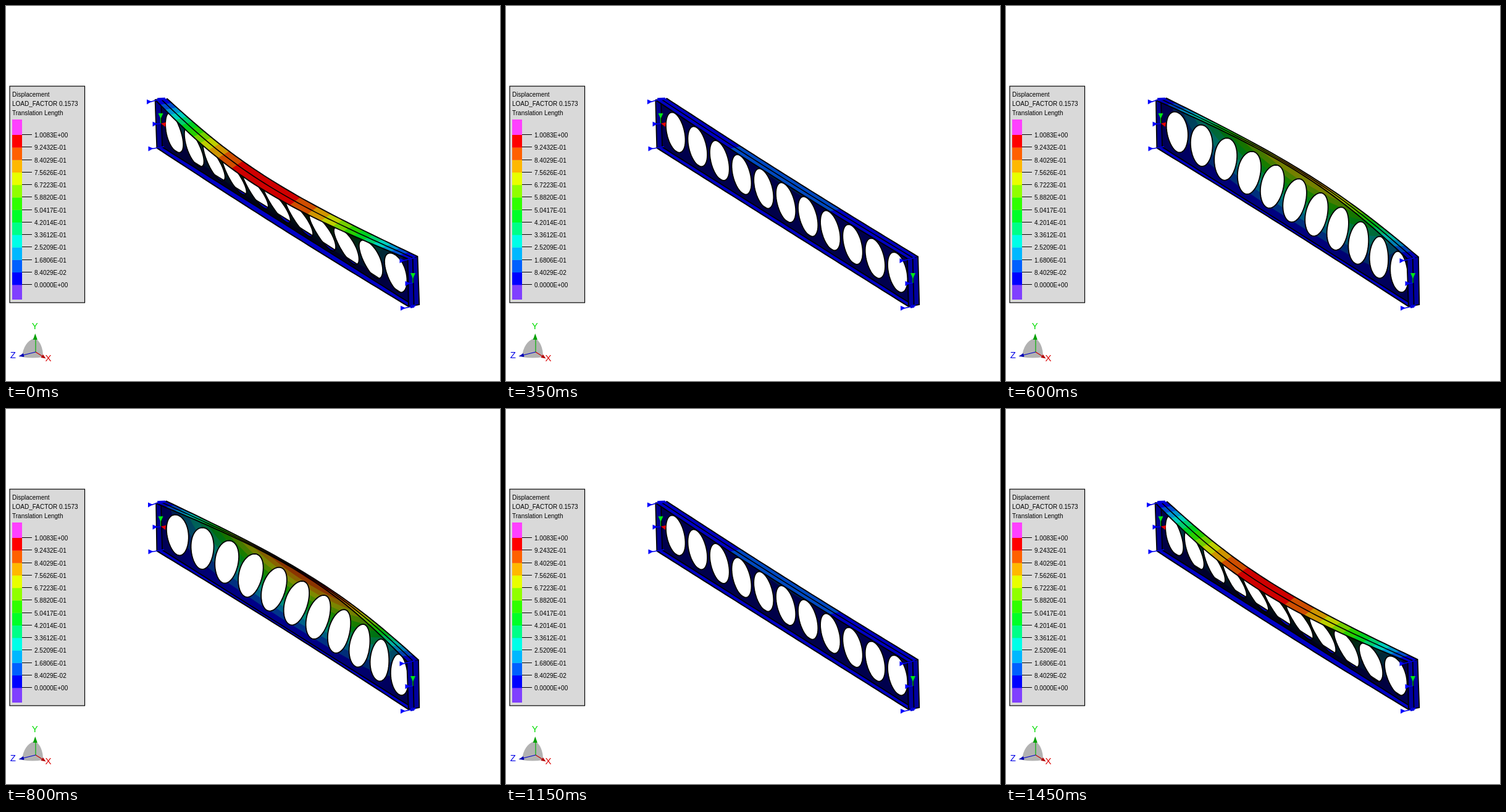
Write an HTML page with a canvas that moves like this. It is 800 by 608 pixels and loops after 1.5 s.

```html
<!DOCTYPE html>
<html>
<head>
<meta charset="utf-8">
<title>Displacement</title>
<style>
html, body { margin: 0; width: 100%; height: 100%; overflow: hidden; background: #fff; }
svg, canvas { position: absolute; left: 0; top: 0; }
text { font-family: "Liberation Sans", Arial, sans-serif; font-size: 10px; }
.axis { font-size: 15px; }
</style>
</head>
<body>
<svg id="hud" width="800" height="608">
  <rect x="6" y="130" width="121.5" height="351" fill="#d9d9d9" stroke="#000" stroke-width="1.2"/>
  <text x="10" y="147">Displacement</text>
  <text x="10" y="162">LOAD_FACTOR 0.1573</text>
  <text x="10" y="177">Translation Length</text>
  <g id="scale"></g>
  <path d="M26 569Q28 545 47 538Q60 547 60 569Q43 572 26 569Z" fill="#b2b2b2"/>
  <g stroke-width="1.2">
    <path d="M48 561V538" stroke="#00b400"/>
    <path d="M48 561L60 568.5" stroke="#c80000"/>
    <path d="M48 561L28 566" stroke="#0000c8"/>
  </g>
  <path d="M47.3 531L43.8 541H50.8Z" fill="#00a000"/>
  <path d="M64.5 571.5L56.5 570L60 565Z" fill="#b40000"/>
  <path d="M20.5 568L28 563L29.5 569Z" fill="#0000b4"/>
  <text class="axis" x="41.7" y="523.5" fill="#00dc00">Y</text>
  <text class="axis" x="6.7" y="571" fill="#0000e6">Z</text>
  <text class="axis" x="63.5" y="576" fill="#dc0000">X</text>
</svg>
<canvas id="view" width="800" height="608"></canvas>
<script>
const LOOP = 1500, STEP = 50, MAX = 1.008348, N = 12, HOLES = 11;
const PEAK = 0.98; // share of the scale reached at full swing
// contour colours, low to high
const BANDS = [[0, 0, 255], [0, 96, 255], [0, 184, 255], [0, 255, 232], [0, 255, 136], [0, 255, 40],
  [48, 255, 0], [144, 255, 0], [232, 255, 0], [255, 184, 0], [255, 96, 0], [255, 0, 0]];
const rgb = (c, k = 1) => `rgb(${c.map(v => Math.round(v * k))})`;

function buildScale() {
  const row = 20.25, top = 209;
  const bar = (y, h, fill) => `<rect x="10" y="${y}" width="16" height="${h}" fill="${fill}"/>`;
  let out = bar(184, 25, '#ff40ff') + bar(452, 24, '#8040ff');
  BANDS.forEach((c, i) => out += bar(top + (N - 1 - i) * row, row + 0.3, rgb(c)));
  for (let i = 0; i <= N; i++) {
    const y = top + i * row;
    const [m, e] = (MAX * (N - i) / N).toExponential(4).split('e');
    const label = m + 'E' + e[0] + e.slice(1).padStart(2, '0');
    out += `<path d="M26 ${Math.round(y) - 0.5}H42" stroke="#000"/><text x="46" y="${y + 4}">${label}</text>`;
  }
  document.getElementById('scale').innerHTML = out;
}

const g = document.getElementById('view').getContext('2d');
g.lineJoin = 'round';
let amp = 1;

const mode = u => Math.sin(Math.PI * u);
const sway = v => 0.75 * v + 0.25 * v * v;
const swayInv = s => -1.5 + Math.sqrt(2.25 + 4 * s);

// u along the beam, v up the web, z across the flange (+1 is near)
function P(u, v, z = 0) {
  const r = amp * mode(u), s = r * sway(v);
  const roll = 4 * (0.75 + 0.5 * v) * z * r;
  const x = u - 0.0019 * z * amp * Math.cos(Math.PI * u) * sway(v);
  return [253 + 407.6 * x - 2 * v - 8.7 * z - 36 * s,
    228.7 + 257 * x - 77.7 * v + 1.5 * z + 8 * s + roll];
}

function run(f, from = 0, to = 1, n = 48) {
  return Array.from({ length: n + 1 }, (_, i) => f(from + (to - from) * i / n));
}
const edge = (v, z, from, to) => run(u => P(u, v, z), from, to);

function trace(pts, close) {
  pts.forEach(([x, y], i) => i ? g.lineTo(x, y) : g.moveTo(x, y));
  if (close) g.closePath();
}
function fill(pts, color) {
  g.beginPath(); trace(pts, true); g.fillStyle = color; g.fill();
}
function line(pts, width = 2, color = '#000', close = false) {
  g.beginPath(); trace(pts, close);
  g.lineWidth = width; g.strokeStyle = color; g.stroke();
}
const strip = (v, z0, z1, from = 0, to = 1) => [...edge(v, z0, from, to), ...edge(v, z1, from, to).reverse()];

// calls back for each contour level with the range of u reaching it
function levels(draw) {
  for (let k = 0; k < N; k++) {
    const need = k / N / (PEAK * Math.abs(amp) + 1e-9);
    if (need >= 1) break;
    const u = Math.asin(need) / Math.PI;
    draw(BANDS[k], need, u, 1 - u);
  }
}

function web() {
  const holes = Array.from({ length: HOLES }, (_, i) => {
    const c = 0.0564 + 0.0882 * i;
    return run(q => P(c + 0.0392 * Math.cos(q), 0.492 + 0.4 * Math.sin(q)), 0, 2 * Math.PI);
  });
  g.save();
  g.beginPath();
  trace([...edge(0, 0), ...edge(1, 0).reverse()], true);
  holes.forEach(h => trace(h, true));
  g.clip('evenodd');
  levels((c, need, a, b) => {
    const low = run(u => P(u, swayInv(Math.min(1, need / Math.max(mode(u), 1e-9)))), a, b);
    fill([...low, ...edge(1, 0, a, b).reverse()], rgb(c));
  });
  // tilting towards the viewer darkens the web
  const [x0, y0] = P(0, 0.5), [x1, y1] = P(1, 0.5);
  const dim = g.createLinearGradient(x0, y0, x1, y1);
  for (let i = 0; i <= 10; i++) {
    const lit = 0.31 - 0.24 * amp * mode(i / 10);
    dim.addColorStop(i / 10, `rgba(0,0,0,${1 - lit})`);
  }
  g.fillStyle = dim;
  g.fillRect(200, 120, 500, 400);
  g.restore();
  holes.forEach(h => line(h, 1.8, '#000', true));
}

function topFlange() {
  levels((c, need, a, b) => fill(strip(1, 1, -1, a, b), rgb(c, 0.75 + 0.06 * amp)));
  [-1, 0, 1].forEach(z => line(edge(1, z), z ? 1.9 : 1.6));
}

function plate(u, z0, z1, color) {
  const q = [P(u, 1, z0), P(u, 1, z1), P(u, 0, z1), P(u, 0, z0)];
  fill(q, color);
  line(q, 1.8, '#000', true);
}

function pin(x, y, tx, ty) {
  line([[x + 6, y], [tx, ty]], 1.5, '#0000e6');
  fill([[x, y - 4], [x + 8, y - 0.5], [x, y + 4]], '#0000ff');
}
function drop(x, y) {
  line([[x, y + 6], [x, y + 16]], 1.2, '#00c800');
  fill([[x - 4, y], [x + 4, y], [x, y + 9]], '#00e614');
}

function supports() {
  pin(229 - amp, 155.5, 247, 151.5);
  fill([[245, 149], [258, 148.5], [257, 152], [246, 154]], '#0000dc');
  pin(237.5, 191.5, 251, 190.5);
  pin(230.5, 231.5, 256, 228);
  pin(637.5, 413, 662, 408);
  pin(646.5, 450, 659, 449);
  pin(639, 490, 664, 485.5);
  fill([[655, 485], [663, 484], [661, 489], [655, 490]], '#0000dc');
  drop(250.5, 174);
  drop(659, 433);
  fill([[251, 190.5], [259, 188.5], [258, 196]], '#e60000');
}

function render(time) {
  const step = Math.floor(time % LOOP / STEP);
  amp = Math.cos(2 * Math.PI * step * STEP / LOOP);
  g.clearRect(0, 0, 800, 608);

  fill(strip(0, 0, -1), rgb(BANDS[0], 0.75));
  line(edge(0, -1), 1.8);
  web();
  fill(strip(0, 1, 0), rgb(BANDS[0], 0.78));
  line(edge(0, 0), 1.8);
  line(edge(0, 1), 2);
  plate(0, 1, 0, rgb(BANDS[0], 0.55));
  plate(1, 1, -1, rgb(BANDS[0], 0.62));
  line([P(1, 1), P(1, 0)], 1.8);
  topFlange();
  supports();
}

buildScale();
const start = performance.now();
(function loop() {
  render(performance.now() - start);
  requestAnimationFrame(loop);
})();
</script>
</body>
</html>
```
